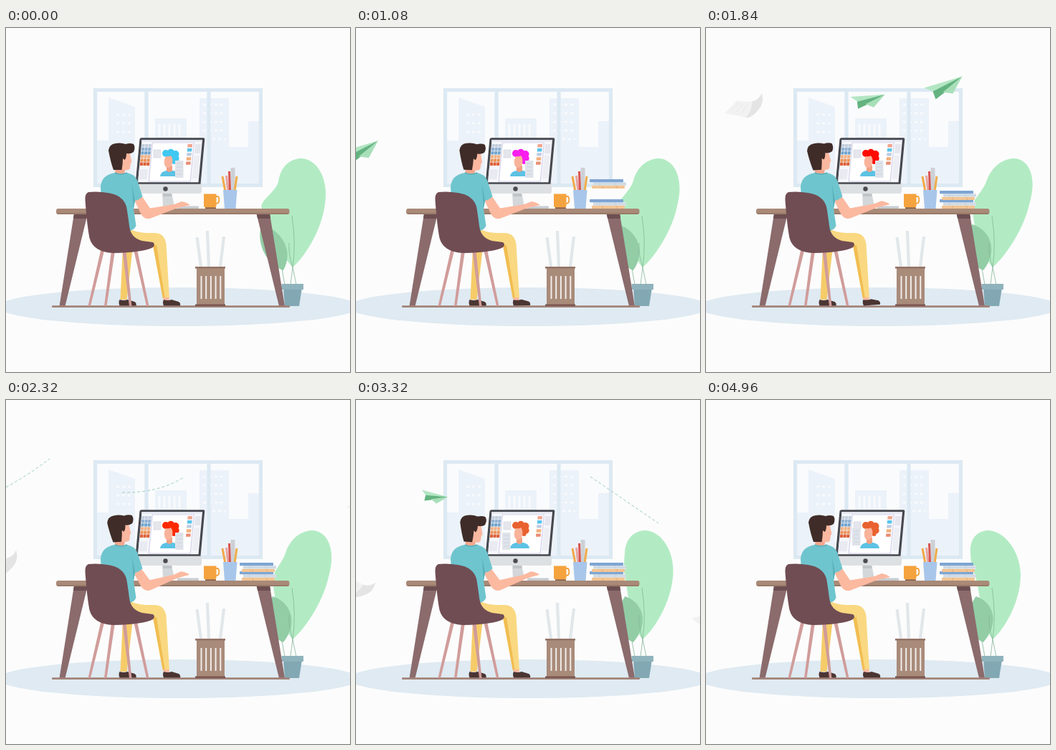
Animation of 480 by 480 pixels, one loop 5000 ms. Source, as an HTML page:

```html
<!DOCTYPE html>
<html lang="en">
<head>
<meta charset="utf-8">
<title>Designer at a desk</title>
<style>
html, body { margin: 0; width: 100%; height: 100%; overflow: hidden; background: #fcfcfc; }
svg { display: block; width: 100vw; height: 100vh; }
</style>
</head>
<body>
<svg viewBox="0 0 480 480">
  <defs>
    <g id="sheet">
      <path d="M-26 11Q-14 -1 -9 -7Q7 -4 18 -7Q23 -9 26 -17Q30 -4 22 5Q13 17 4 17Q-10 13 -26 11Z" fill="#f2f2f2"/>
      <path d="M26 -17Q30 -4 22 5Q13 17 4 17Q12 8 13 -6Q22 -8 26 -17Z" fill="#e4e4e4"/>
      <path d="M-17 7L-5 -4M-10 9L0 -2M-3 11L6 -1" stroke="#e7e8e8" fill="none"/>
    </g>
    <g id="plane">
      <path d="M0 0L-53 16L-40 21Z" fill="#b2e6c2"/>
      <path d="M0 0L-41 21L-37 32L-24 22Z" fill="#63b380"/>
      <path d="M0 0L-27 22L-13 24Z" fill="#a8dfb9"/>
    </g>
    <g id="books">
      <rect x="331" y="231" width="46" height="5" fill="#d9e3ec"/>
      <path d="M331 233.500H377M340 231V236M362 231V236" stroke="#c3d0dd"/>
      <rect x="326" y="227" width="47" height="4.300" rx="1" fill="#7ea5d3"/>
      <rect x="329" y="235.800" width="46" height="4.200" rx="1" fill="#f2c594"/>
      <path d="M344 236V240M364 236V240" stroke="#e6ae76"/>
    </g>
    <path id="shoe" d="M220 379Q226 381 231 379L241 382Q244 384 243 387.500H220Q218 383 220 379Z" fill="#4b3532"/>
  </defs>

  <rect width="480" height="480" fill="#fcfcfc"/>
  <ellipse cx="241" cy="389" rx="252" ry="27" fill="#dfeaf2"/>

  <!-- window -->
  <rect x="122" y="84" width="236" height="138" fill="#fafbfd"/>
  <g fill="#ecf2f9">
    <path d="M127 157H143V97L180 110V217H127Z"/>
    <path d="M208 126H252V217H208Z"/>
    <path d="M270 98H311V166H338V130H353V217H270Z"/>
  </g>
  <g stroke="#f8fafd" fill="none">
    <path d="M214 134V152M221 134V152M228 134V152M235 134V152M242 134V152" stroke-width="3"/>
    <path d="M154 121H176M154 133H176M154 145H176M275 107H306M275 119H306M275 131H306M275 143H306M288 155H306" stroke-width="3" stroke-dasharray="4 4"/>
  </g>
  <path d="M124.500 86.500H355.500V219.500H124.500ZM196 87V219M283 87V219" fill="none" stroke="#dce9f3" stroke-width="5.200"/>

  <g id="sky"></g>

  <!-- plant -->
  <path id="leaf" fill="#b2ebc3"/>
  <path id="leaf2" d="M387 338C362 330 348 297 357 274C385 282 402 312 387 338Z" fill="#92cda6"/>
  <path d="M385 336L389 358M400 334L397 358M400 334L405 358M400 334Q394 316 395 300M400 334Q405 300 399 262" fill="none" stroke="#86b69a" stroke-width=".8"/>
  <path d="M387 363H413L409 388H389Z" fill="#82a8b4"/>
  <rect x="384.500" y="357" width="30.500" height="8" fill="#8fb3bd"/>

  <!-- monitor -->
  <path d="M218 230H231L235 249H219Z" fill="#d3d7da"/>
  <path d="M219 231H231L232 235H219Z" fill="#bfc4c8"/>
  <path d="M181 217H271.500L273 217V228Q273 231 270 231H184Q181 231 181 228Z" fill="#dde0e2"/>
  <circle cx="222.500" cy="224.500" r="3.200" fill="#4b4b50"/>
  <path d="M189 153.300H275.500Q277.500 153.300 277.300 155L271.500 217.800H180.500L186.500 155Q187 153.300 189 153.300Z" fill="#464950"/>
  <path d="M189.500 156.300H274L268.500 215.300H184Z" fill="#f6f7fb"/>
  <g transform="translate(187 153) skewX(-5.400)">
    <rect x="2.500" y="3.300" width="84.500" height="2.500" fill="#e4e7f0"/>
    <rect x="18" y="7" width="58" height="54" fill="#fff" stroke="#d5d2e9" stroke-width="1.200"/>
    <rect x="78" y="9" width="8" height="13" fill="#e5e7ef"/>
    <rect x="78" y="25" width="8" height="32" fill="#eceef4"/>
    <g id="swatches"></g>
    <rect x="3" y="44" width="12" height="14" fill="#e9ebf2"/>
  </g>
  <rect x="206" y="170" width="10" height="11" fill="#e4e6ec" stroke="#d4d8e0" stroke-width=".7"/>
  <path d="M215 207Q216 200 224 199H233Q241 200 242 207Z" fill="#5cc2e4"/>
  <path d="M224 192H232V199Q228 203 224 199Z" fill="#f0a184"/>
  <g id="hair">
    <circle cx="223" cy="175" r="5"/><circle cx="230" cy="173.500" r="4.800"/>
    <circle cx="236.500" cy="176" r="5"/><circle cx="237" cy="182" r="4.700"/>
    <circle cx="234.500" cy="187" r="3"/><path d="M222 174H237V187H228Z"/>
  </g>
  <path d="M223 179Q228 180 230 178Q234 183 231.500 191Q228 197 223 194Q220 190 221 184Z" fill="#f9b39a"/>
  <g id="panel">
    <rect x="236" y="185" width="11.500" height="24" fill="#dfe3ea"/>
    <path d="M238 189H246M238 194H246M238 199H246M238 204H246" stroke="#cfd4de"/>
  </g>

  <!-- desk -->
  <path d="M95 259H114L82.500 388H74.500Z M349.500 259H368L389 388H381Z" fill="#8b6b6c"/>
  <path d="M95 259H114L112.300 266H93.900Z M349.500 259H368L369.200 266H351.200Z" fill="#6d4f52"/>
  <rect x="64" y="387.300" width="332" height="2.600" rx="1" fill="#a28378"/>
  <rect x="70" y="252" width="325.500" height="8" rx="3" fill="#a98a78"/>
  <path d="M72 259H394" stroke="#957563" stroke-width="1.500"/>
  <rect x="239" y="248.500" width="30" height="3.500" rx="1" fill="#c7ccd2"/>

  <!-- bin -->
  <path d="M266.500 292L272 333M281 283L283 333M304 291L299 333" stroke="#e1e7ea" stroke-width="4.200"/>
  <rect x="266" y="334" width="39" height="53" fill="#a98b7a"/>
  <rect x="264" y="333" width="42" height="2.600" fill="#957468"/>
  <rect x="264" y="385.500" width="42" height="2.600" fill="#795650"/>
  <path d="M271.500 362H300.300" stroke="#f1ece9" stroke-width="32" stroke-dasharray="2 4.700"/>

  <!-- cup and pencils -->
  <path d="M292 235H295Q297.300 235 297.300 240Q297.300 245 293 245" fill="none" stroke="#f3a03a" stroke-width="1.800"/>
  <path d="M276 231.500H293.500V248Q293 250.500 290 250.500H279.500Q276 250.500 276 248Z" fill="#f5a33e"/>
  <rect x="278" y="250.300" width="15" height="1.700" fill="#8a5b3d"/>
  <rect x="313.500" y="195" width="6" height="32" fill="#cdd0d5"/>
  <g fill="none" stroke-width="3">
    <path d="M302 207L306 228" stroke="#f3a848"/>
    <path d="M307.500 206L310 228" stroke="#e9a59f"/>
    <path d="M311.500 200L312.500 228" stroke="#d9534f"/>
    <path d="M322 207L319 228" stroke="#f0ad4b"/>
  </g>
  <path d="M303 226H322.500L320.500 252H305Z" fill="#a8c6ea"/>
  <use id="low" href="#books"/>
  <use id="high" href="#books"/>

  <!-- person -->
  <path d="M163 306H177L168.500 379H159.500Z" fill="#f6cc69"/>
  <use href="#shoe" transform="translate(-61.500 0)"/>
  <path d="M170 279Q180 285 195 286H207Q221 286 223.500 301L228 378H219L205 303H172Z" fill="#f9d881"/>
  <path d="M205 303L219 378H222L210 303Z" fill="#f1bd52"/>
  <path d="M219 376H227.500V380H221Z" fill="#f9b9a0"/>
  <use id="foot" href="#shoe"/>
  <path id="arm" d="M179 240L190 235L201 251.500L235 246L245 242Q252 243 257 247L246 249.500L238 251.500L202 265.500Q193 268.500 188 259Z" fill="#fbb9a0"/>
  <g id="head">
    <path d="M153 188H166V200Q165 207 158 208L152 204Z" fill="#f3a78e"/>
    <path d="M160 175H173L175.500 187L174 188.500L173 196Q171 199.500 163 198Z" fill="#fbb8a0"/>
    <path d="M143 171Q144 162 153 161Q160 159.500 167 162Q173 160 178 162Q181 167 178 173Q174 176 168 175Q168 182 165.500 184L163 182Q163 189 161.500 198H150Q146 187 143 171Z" fill="#3f2c28"/>
  </g>
  <path d="M152 202Q160 206 169 202Q179 204 183 212L190.500 235Q186 240 180 241L178 252L181.500 276Q178 284 168 283H136L132 222Q133 205 152 202Z" fill="#6fc5ce"/>
  <path d="M176 219L180 241L178 252Q177 236 176 219Z" fill="#57afba"/>
  <path d="M152 202Q160 206 169 202" fill="none" stroke="#57afba" stroke-width="1.500"/>

  <!-- chair -->
  <path d="M132 311H137L118 388H114.500ZM147 311H152L140.500 388H137ZM162.500 311H167.500L175.500 388H172ZM178 309H183L199.500 388H196Z" fill="#d09c9a"/>
  <path d="M115 229Q128 227.500 142 230Q163 233 168 249Q170 260 172 276Q174 293 190 297L205 299Q209 302 205 306Q192 313 150 314Q122 313 116.500 293Q113 275 110.500 240Q110 231 115 229Z" fill="#704d53"/>
</svg>
<script>
const LOOP = 5000;
const $ = id => document.getElementById(id);
const set = (el, name, value) => el.setAttribute(name, value);
const clamp = v => Math.max(0, Math.min(1, v));
const mix = (a, b, u) => a + (b - a) * u;
const smooth = u => u * u * (3 - 2 * u);
const ramp = (t, from, to) => smooth(clamp((t - from) / (to - from)));
const bezier = (a, c, b, u) => mix(mix(a, c, u), mix(c, b, u), u);

function add(parent, tag, attrs) {
  const el = document.createElementNS('http://www.w3.org/2000/svg', tag);
  for (const k in attrs) set(el, k, attrs[k]);
  return parent.appendChild(el);
}

function addSwatches(x, cols, width, step, colors) {
  colors.forEach((fill, row) => {
    for (let c = 0; c < cols; c++)
      add($('swatches'), 'rect', { x: x + c * 4.6, y: 9 + row * step, width, height: 4.4, fill });
  });
}
addSwatches(3.5, 3, 4, 5.1, ['#c3cedd', '#8fb2d3', '#6fa3cd', '#f0b183', '#ec9157', '#dd6038']);
addSwatches(67.5, 1, 6.5, 6.1, ['#f1a58f', '#58c5ea', '#bccbe0', '#f2b07d', '#ea8d72']);

// dashed trails: path and the moment it is fully drawn
const trails = [
  ['M480 111C452 112 436 92 427 84C416 71 412 60 418 49', 1440],
  ['M-6 125Q28 107 61 82', 2320],
  ['M162 129Q214 130 249 107', 2320],
  ['M327 107L422 172', 3320]
].map(([d, at]) => {
  const el = add($('sky'), 'path', { d, fill: 'none', stroke: '#9bcfb9', 'stroke-width': 1 });
  return { el, at, len: el.getTotalLength() };
});

function drawTrail({ el, at, len }, t) {
  const from = len * clamp((t - at - 60) / 200);
  const to = len * clamp((t - at + 240) / 200);
  const dashes = [0, from];
  for (let p = from; p < to; p += 7) dashes.push(Math.min(4, to - p), 3);
  dashes.push(0, len * 2);
  set(el, 'stroke-dasharray', dashes.join(' '));
  set(el, 'visibility', to > from ? 'visible' : 'hidden');
}

// each flyer follows one arc: start, control, end
const flyers = [
  { shape: 'plane', time: [980, 2180], x: [-4, 197, 540], y: [172, 82, 40], turn: [0, 0], size: 1 },
  { shape: 'plane', time: [1050, 2290], x: [-4, 66, 540], y: [160, 101, 62], turn: [13, 13], size: .87 },
  { shape: 'plane', time: [3040, 3840], x: [-2, 175, 400], y: [126, 134, 172], turn: [32, 32], size: .68 },
  { shape: 'sheet', time: [1160, 2600], x: [-30, 163, -95], y: [20, 64, 317], turn: [0, 0], size: 1 },
  { shape: 'sheet', time: [2900, 4460], x: [-40, 53, -47], y: [217, 290, 363], turn: [22, 52], size: 1 },
  { shape: 'sheet', time: [2200, 3420], x: [508, 485, 498], y: [128, 226, 324], turn: [18, 31], size: 1 }
];
for (const f of flyers) f.el = add($('sky'), 'use', { href: '#' + f.shape });

function drawFlyer({ el, time: [from, to], x, y, turn, size }, t) {
  const u = (t - from) / (to - from);
  set(el, 'visibility', u >= 0 && u < 1 ? 'visible' : 'hidden');
  set(el, 'opacity', clamp((to - t) / 100));
  set(el, 'transform',
    `translate(${bezier(...x, u)} ${bezier(...y, u)}) rotate(${mix(...turn, u)}) scale(${size})`);
}

// upright leaf outline, clockwise from its base
const outline = [
  [414, 322], [439, 285], [439, 243], [438, 210], [416, 182], [393, 182], [376, 183],
  [368, 196], [369, 213], [369, 228], [374, 240], [377, 250], [384, 280], [386, 318]
];

function drawPlant(t) {
  const out = ramp(t, 0, 1950), back = ramp(t, 2000, 4000);
  const lean = 18 + 18 * out - 36 * back;
  const flare = 26 - 10 * out - 16 * back;
  const pts = outline.map(([x, y], i) => {
    const bend = lean * ((334 - y) / 152) ** 2;
    return [x + bend - (i > 9 && i < 13 ? flare : 0), y];
  });
  set($('leaf'), 'd', `M400 334C${pts.join(' ')} 400 334Z`);
  set($('leaf2'), 'transform',
    `translate(387 338) skewX(${-13 * out - 4 * back}) translate(-387 -338)`);
}

function drop(el, t, start, rest) {
  const u = clamp((t - start) / 330);
  set(el, 'opacity', clamp(u * 4));
  set(el, 'transform', `translate(0 ${mix(-95, rest, u * u)})`);
}

function drawPerson(t) {
  const nod = 3.5 * Math.sin(2 * Math.PI * Math.min(t, 3400) / 2720) * (1 - ramp(t, 4200, 4900));
  set($('head'), 'transform', `rotate(${nod} 158 207)`);

  const reach = ramp(t, 1600, 2250) - ramp(t, 3400, 3900);
  set($('arm'), 'transform', `rotate(${-3 * reach} 194 260)`);

  // the foot taps on a steady beat, with a rest in between
  const beat = 480, tapping = (t > 240 && t < 2160) || t > 4560;
  const off = Math.abs((t + beat / 2) % beat - beat / 2);
  const lift = tapping ? 1 - ramp(off, 0, 160) : 0;
  set($('foot'), 'transform', `rotate(${-9 * lift} 220 387)`);
}

function drawScreen(t) {
  const toRed = ramp(t, 680, 1440), toSoft = ramp(t, 2320, 3320);
  const hue = 194 + 41 * ramp(t, 0, 680) + 125 * toRed + 16 * ramp(t, 1440, 3000);
  const sat = 87 + 13 * toRed - 19 * toSoft;
  const light = 60 - 10 * toRed + 5 * toSoft;
  set($('hair'), 'fill', `hsl(${hue % 360}, ${sat}%, ${light}%)`);
  set($('panel'), 'transform',
    `translate(${-32 * ramp(t, 2500, 3100)} ${-6 * ramp(t, 4200, 4800)})`);
}

function draw(t) {
  trails.forEach(s => drawTrail(s, t));
  flyers.forEach(f => drawFlyer(f, t));
  drop($('low'), t, 354, 12);
  drop($('high'), t, 780, 0);
  drawPlant(t);
  drawPerson(t);
  drawScreen(t);
}

function frame() {
  draw(performance.now() % LOOP);
  requestAnimationFrame(frame);
}
frame();
</script>
</body>
</html>
```
